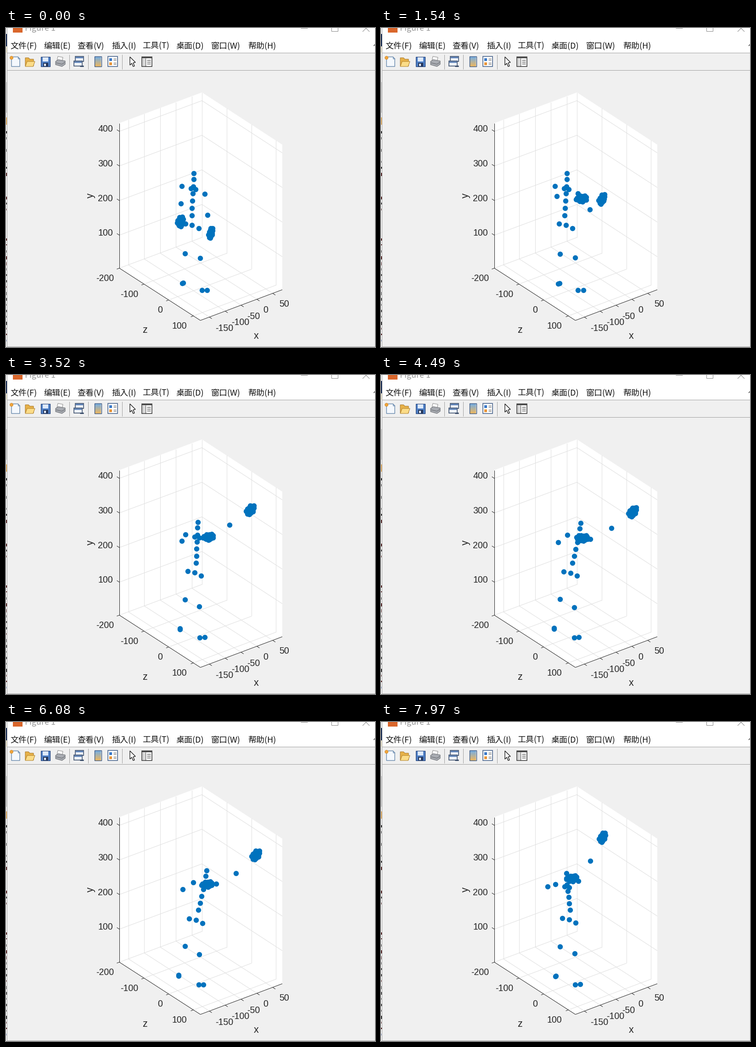
Animation of 804x696 px, one loop 8 s. Source, as a matplotlib script:

```python
import random

import numpy as np
import matplotlib.pyplot as plt
from matplotlib.animation import FuncAnimation
from matplotlib.patches import Circle, Polygon, Rectangle

W, H, DPI = 804, 696, 96
PX = 72 / DPI
LOOP, STEP = 8000, 40
BLUE, INK, GRID = "#0072BD", "#262626", "#dfdfdf"

plt.rcParams["toolbar"] = "None"
fig = plt.figure(figsize=(W / DPI, H / DPI), dpi=DPI, facecolor="#f0f0f0")
ax = fig.add_axes([0, 0, 1, 1])
ax.set_xlim(0, W)
ax.set_ylim(H, 0)
ax.axis("off")


def line(pts, color=INK, width=1.0, z=2):
    # separate segments, so that upright and level ones snap to whole pixels
    for (x0, y0), (x1, y1) in zip(pts, pts[1:]):
        ax.plot([x0, x1], [y0, y1], color=color, lw=width * PX, zorder=z,
                solid_capstyle="butt")


def box(x0, y0, x1, y1, face, edge="none", width=1.0, z=2):
    ax.add_patch(Rectangle((x0, y0), x1 - x0, y1 - y0, fc=face, ec=edge,
                           lw=width * PX, zorder=z))


def poly(pts, face, edge="none", width=1.0, z=2):
    ax.add_patch(Polygon(pts, closed=True, fc=face, ec=edge, lw=width * PX, zorder=z))


def label(x, y, text, size, color=INK, font="Liberation Sans", **kw):
    ax.text(x, y, text, fontsize=size * PX, color=color, family=font, zorder=4, **kw)


# ---- window frame ----
def draw_window():
    cjk = "Noto Sans CJK JP"
    box(2, 0, W, 54, "white", z=1)
    box(15, 0, 36, 10, "#d9662b")
    label(41, 6.5, "Figure 1", 18, "#999999", cjk)
    line([(642, 0), (657, 0)], "#888888")
    line([(709, -2), (709, 7), (723, 7), (723, -2)], "#888888")
    line([(777, 8), (786, -1)], "#888888")
    line([(792, 8), (783, -1)], "#888888")
    menu = [(10, "文件(F)"), (83, "编辑(E)"), (156, "查看(V)"), (231, "插入(I)"),
            (298, "工具(T)"), (371, "桌面(D)"), (447, "窗口(W)"), (528, "帮助(H)")]
    for x, text in menu:
        label(x - 0.5, 44.5, text, 18, "#111111", cjk)
    line([(801, 39), (804, 36)], "#333333", 1.3)
    for y in (54, 92):
        line([(2, y), (W, y)], "#a0a0a0")
    for x in (138, 179, 253):
        line([(x, 58), (x, 90)], "#a0a0a0")
    line([(2, H - 1), (W, H - 1)], "#a8a8a8")


def draw_left_strip():
    box(0, 0, 2, H, "#f7f7f7", z=1)
    box(0, 13, 2, 40, "#0d2350")
    box(0, 40, 2, 54, "#f3ecd2")
    box(0, 118, 2, 185, "#d4d4d4")
    box(0, 195, 2, 211, "#e8b469")
    rng = random.Random(4)
    for y in range(225, 690, 13):
        if y > 480 or rng.random() < 0.45:
            color = rng.choice(["#333333", "#555555", "#5a2a2a", "#7a90c0"])
            box(0, y, rng.randint(1, 2), y + rng.randint(2, 7), color)
    line([(2, 0), (2, H)], "#a8a8a8")


# ---- toolbar icons ----
def draw_icons():
    # new
    poly([(12, 63), (26, 63), (30, 67), (30, 84), (12, 84)], "#f4f8fd", "#5b7fa6", 1.3)
    line([(26, 63), (26, 67), (30, 67)], "#5b7fa6")
    ax.add_patch(Circle((12, 65), 3.5, fc="#f0a63c", ec="#c77a1a", lw=0.5, zorder=3))
    # open
    poly([(42, 65), (49, 65), (52, 68), (60, 68), (60, 83), (42, 83)], "#e7b24a", "#a87420")
    poly([(46, 73), (63, 73), (59, 84), (42, 84)], "#fbdc88", "#b07f27", z=3)
    # save
    box(76, 63, 96, 84, "#4f80c6", "#23427a", 1.2)
    box(80, 64, 92, 73, "#dfeafa", z=3)
    box(81, 76, 92, 84, "#26385c", z=3)
    box(83, 78, 87, 83, "#e8eef8", z=4)
    # print
    poly([(113, 62), (124, 64), (122, 73), (111, 72)], "white", "#888888")
    poly([(108, 73), (114, 69), (129, 72), (129, 79), (122, 84), (108, 80)],
         "#a9acb2", "#66696f", z=3)
    line([(109, 76), (122, 79), (128, 75)], "#5d6066", 1, 4)
    # linked windows
    for x, y in ((151, 62), (148, 72)):
        box(x, y, x + 18, y + 11, "#eef3fa", "#3c4f6c", 1.6, z=3)
        box(x + 1, y + 1, x + 17, y + 4, "#5f83b8", z=3)
    line([(161, 83), (169, 83)], "#3c4f6c", 3, 4)
    # colorbar
    for y in range(62, 85):
        k = (y - 62) / 22
        box(193, y, 207, y + 1, (0.45 + 0.5 * k, 0.68 + 0.04 * k, 0.90 - 0.55 * k), z=3)
    box(193, 62, 208, 84, "none", "#3d5a85", 1.4, z=4)
    # legend
    box(222, 62, 243, 84, "white", "#3d5a85", 1.5)
    for y, c in ((66, "#3a78c8"), (75, "#e8953a")):
        box(225, y, 231, y + 6, c, z=3)
        line([(234, y + 1), (240, y + 1)], "#555555", 1, 3)
        line([(234, y + 4), (240, y + 4)], "#555555", 1, 3)
    # pointer
    poly([(270, 63), (270, 81), (274, 77), (277, 84), (280, 83), (277, 76), (282, 75)],
         "white", "#111111", 1.3)
    # plot tools
    box(296, 63, 318, 84, "white", "#333333", 1.5)
    box(296, 63, 318, 66, "#4a4a4a", z=3)
    box(297, 67, 303, 83, "#d5d5d5", z=3)
    line([(304, 66), (304, 84)], "#333333", 1, 3)
    for y in (70, 74, 78):
        line([(307, y), (315, y)], "#555555", 1.4, 3)


# ---- 3-D axes, already projected to the stage ----
LEFT, BACK = np.array([247, 524]), np.array([427, 457])
RIGHT, FRONT = np.array([602, 571]), np.array([423.5, 638])
UP = np.array([0, -316.5])


def draw_axes():
    poly([LEFT + UP, BACK + UP, RIGHT + UP, RIGHT, FRONT, LEFT], "white", z=1)
    z_dir, x_dir = (FRONT - LEFT) / 176, (BACK - LEFT) / 180
    z_out, x_out = np.array([-5.6, 2.1]), np.array([5.4, 3.5])

    for i in range(4):
        rise = np.array([0, -72 - 75.5 * i])
        line([LEFT + rise, BACK + rise, RIGHT + rise], GRID)
        line([LEFT + rise, LEFT + rise - x_out], INK, z=3)
        label(233, 453 - 75.5 * i, str(100 * (i + 1)), 19.5, ha="right")

        along = z_dir * 53.6 * i
        far = BACK + along
        line([LEFT + along, far, far + UP], GRID)
        line([LEFT + along, LEFT + along + z_out], INK, z=3)
        label(235 + 53 * i, 552 + 34.6 * i, str(100 * i - 200), 19.5, ha="right")

    for i in range(5):
        along = x_dir * (19.6 + 34.6 * i)
        near, far = FRONT + along, LEFT + along
        line([near, far, far + UP], GRID)
        line([near, near + x_out], INK, z=3)
        label(456 + 34.7 * i, 661 - 13.2 * i, str(50 * i - 150), 19.5)

    line([LEFT + UP, LEFT, FRONT, RIGHT], INK, z=3)
    label(545, 677.5, "x", 21.5, ha="center")
    label(303, 665, "z", 21.5, ha="center")
    label(184, 366, "y", 21.5, ha="center", va="center", rotation=90)


# ---- motion ----
def glide(times, keys, t):
    """Monotone cubic through a few key points, at rest before the first."""
    times, keys = np.asarray(times, float), np.asarray(keys, float)
    t = np.clip(t, times[0], times[-1])
    h = np.diff(times)[:, None]
    d = np.diff(keys, axis=0) / h
    prod, total = d[:-1] * d[1:], d[:-1] + d[1:]
    inner = np.where(prod > 0, 2 * prod / np.where(prod > 0, total, 1), 0)
    m = np.vstack([0 * d[:1], inner, d[-1:]])
    k = np.clip(np.searchsorted(times, t, side="right") - 1, 0, len(h) - 1)
    u, hk = ((t - times[k]) / h[k, 0])[:, None], h[k]
    return ((1 + 2 * u) * (1 - u) ** 2 * keys[k] + u * (1 - u) ** 2 * hk * m[k]
            + u * u * (3 - 2 * u) * keys[k + 1] - u * u * (1 - u) * hk * m[k + 1])


BODY_T = [0, 1540, 2240, 3520, 4490, 6080, 7970]
HAND_T = [800, 1540, 2240, 3520, 4950, 6080, 7970]
WAIST = [(404.5, 409), (400, 409), (402, 409), (414, 410), (417.5, 410), (419, 410), (412, 410)]
HEAD = [(409, 317), (405, 317), (402, 321), (417.5, 321), (435, 323), (437, 324), (403.5, 330)]
LEFT_HAND = [(380, 422), (438, 371), (456, 346), (441, 353), (439, 356), (438, 354), (416, 341)]
RIGHT_HAND = [(446, 447), (482, 371), (508, 313), (532, 294), (551, 300), (544, 290), (482, 251)]


def elbow(shoulder, hand, reach, bend):
    """Joint between shoulder and hand, pushed out as the two come closer."""
    span = hand - shoulder
    chord = np.hypot(*span.T)
    push = np.sqrt(np.maximum(reach ** 2 - chord ** 2 / 4, 0))
    push *= np.abs(span[:, 0]) / chord
    return (shoulder + hand) / 2 + push[:, None] * np.array(bend)


def knuckles(centre, half, lean, count=22):
    """Sunflower of points on a leaning ellipse."""
    i = np.arange(count) + 0.5
    r, a = np.sqrt(i / count) * 1.03, i * np.pi * (3 - 5 ** 0.5)
    u, v = r * np.cos(a), r * np.sin(a)
    unit = np.stack([(u - lean * v) / np.hypot(1, lean), v], axis=1)
    return centre[:, None] + half[:, None] * unit


def build(t):
    waist, head = glide(BODY_T, WAIST, t), glide(BODY_T, HEAD, t)
    neck = waist + (head - waist) * (0.8, 0.69)
    lean = (waist[:, :1] - 400) / 19
    root = (402.7, 430) + lean * (10.8, 2)

    joints = [root, root + (-14.4, -3), root + (14.4, 6.5)]
    # knees, ankles and toes drift with the lean
    for rest, drift in [((390, 493), (0, -4)), ((423.5, 501), (-3, 6)),
                        ((386, 558), (-10, -4)), ((389, 557), (-13, -5)),
                        ((429, 572), (-9, 1)), ((441, 572), (-11, 0.5))]:
        joints.append(rest + lean * drift)
    joints += [waist + (neck - waist) * f for f in (0, 0.25, 0.5, 0.75, 1)]
    joints += [neck + (head - neck) * 0.55, head, neck + (-5.5, 4), neck + (4.5, 6)]

    hand_l, hand_r = glide(HAND_T, LEFT_HAND, t), glide(HAND_T, RIGHT_HAND, t)
    turn = (t / LOOP)[:, None] ** 2
    arm_l, arm_r = neck + (-25.5, -1), neck + (24.5, 16) - turn * (0, 24)
    joints += [arm_l, arm_r, elbow(arm_l, hand_l, 43, (-0.95, 0.33)),
               elbow(arm_r, hand_r, 56, (0, 0.62))]

    lift = np.clip((422 - hand_l[:, 1:]) / 51, 0, 1)
    stretch = np.clip((hand_r - arm_r)[:, :1] / 90, 0, 1)
    return np.concatenate([np.stack(joints, axis=1),
                           knuckles(hand_l, (7.5, 11) + lift * (5, -4.5), 0.1),
                           knuckles(hand_r, (4, 11.5) + stretch * (5.5, -1), 0.5)], axis=1)


draw_window()
draw_left_strip()
draw_icons()
draw_axes()

body = build(np.arange(0, LOOP, STEP, dtype=float))
dots, = ax.plot(*body[0].T, "o", color=BLUE, ms=11.4 * PX, mew=0, zorder=5)


def update(i):
    dots.set_data(*body[i].T)
    return dots,


anim = FuncAnimation(fig, update, frames=LOOP // STEP, interval=STEP,
                     repeat=True, repeat_delay=0, blit=False)
plt.show()
```
